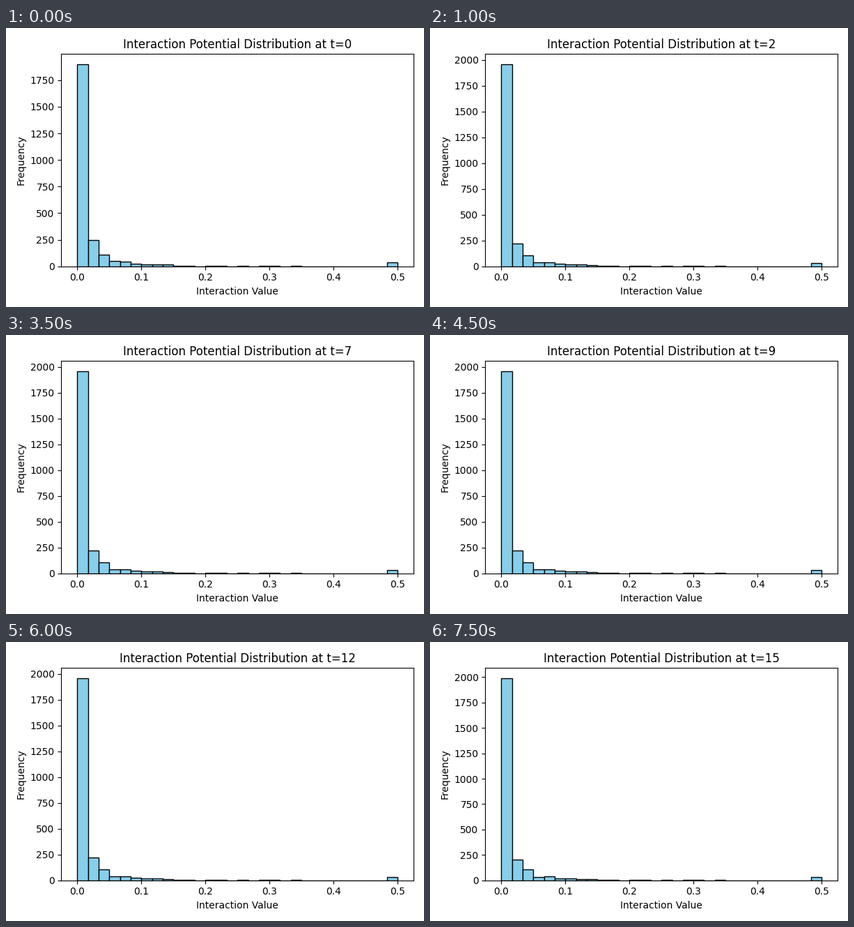
A matplotlib script that plays this animation: 600 px wide and 400 px high, repeating every 8 s.

```python
import numpy as np
import matplotlib.pyplot as plt
from matplotlib.animation import FuncAnimation

FRAMES, INTERVAL = 16, 500
BINS, TOP = 30, 0.5
SHIFTS = (1, 2, 13)  # steps at which the distribution moves on

# Key points of the falling slope: bin -> (count at start, loss per shift)
SLOPE = {1: (246, 14), 2: (108, 1), 3: (50, 6), 4: (44, 2), 5: (24, 1), 8: (15, 1)}


def counts_at(step):
    phase = sum(step >= s for s in SHIFTS)
    counts = np.zeros(BINS)
    counts[0] = 1900 + 30 * phase
    slope = np.arange(1, 9)
    counts[slope] = np.interp(slope, list(SLOPE),
                              [start - loss * phase for start, loss in SLOPE.values()])
    # Thin scatter of near-evenly spaced values beyond the slope
    scatter = (9.1 + 1.6 * np.arange(8)).astype(int)
    counts[scatter] = 4
    counts[-1] = 36 - 4 * (phase // 2)
    return counts


fig, ax = plt.subplots(figsize=(6, 4), dpi=100)
edges = np.linspace(0, TOP, BINS + 1)
centers = (edges[:-1] + edges[1:]) / 2


def draw(step):
    ax.clear()
    ax.hist(centers, bins=edges, weights=counts_at(step),
            color="skyblue", edgecolor="black")
    ax.set_title(f"Interaction Potential Distribution at t={step}")
    ax.set_xlabel("Interaction Value")
    ax.set_ylabel("Frequency")


draw(0)
fig.tight_layout()

anim = FuncAnimation(fig, draw, frames=FRAMES, init_func=lambda: draw(0),
                     interval=INTERVAL, repeat=True, repeat_delay=0)
plt.show()
```
